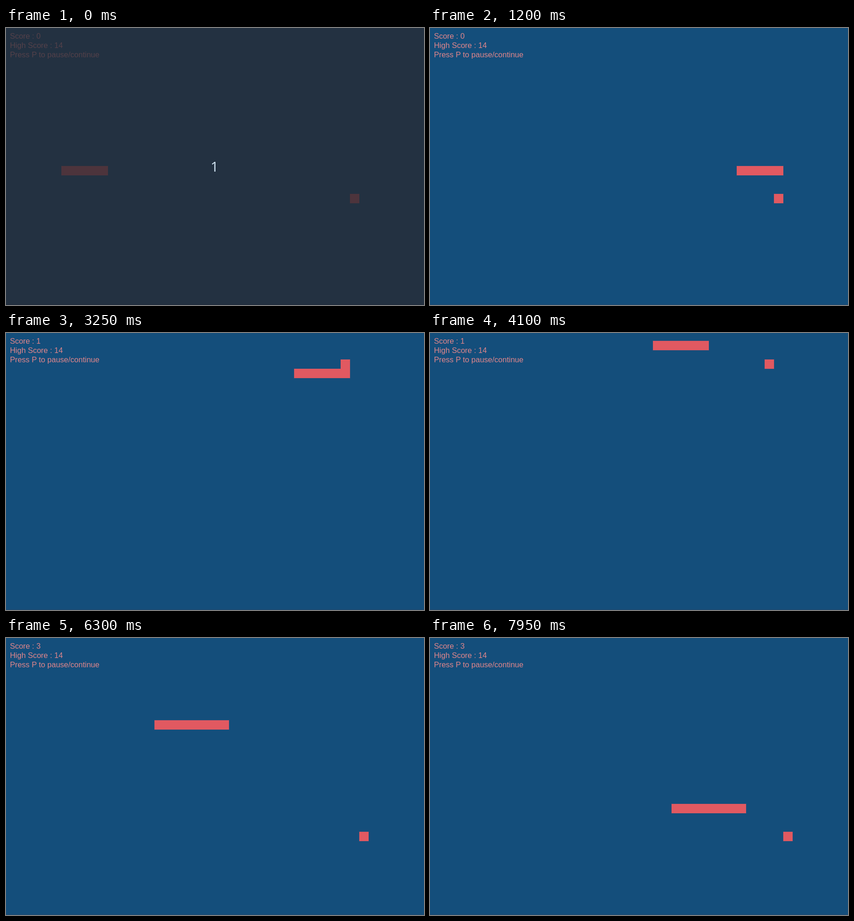
An HTML page that plays this animation: 898 px wide and 596 px high, repeating every 8 s.

```html
<!DOCTYPE html>
<html lang="en">
<head>
<meta charset="utf-8">
<title>Snake</title>
<style>
  html, body { margin: 0; width: 100%; height: 100%; overflow: hidden; }
  svg { display: block; width: 898px; height: 596px;
    --bg: #144e7b; --edge: #1b4b73; --body: #e15961; --ink: #e1868b; }
  svg.wait { --bg: #233141; --edge: #212d3c; --body: #4d343c; --ink: #54414a; }
  .bg { fill: var(--bg); }
  .edge { fill: var(--edge); }
  .body { fill: var(--body); stroke: var(--body); stroke-width: 2; stroke-opacity: .1; }
  .hud { fill: var(--ink); font: 16.5px "Liberation Sans", Arial, sans-serif; }
  .count { fill: #d3e6f5; font: 30px "Open Sans", "Noto Sans", sans-serif; visibility: hidden; }
  .wait .count { visibility: visible; }
</style>
</head>
<body>
<svg id="stage" class="wait" viewBox="0 0 898 596">
  <rect class="bg" width="898" height="596"/>
  <rect class="edge" y="594" width="898" height="2"/>
  <path id="cells" class="body" shape-rendering="crispEdges"/>
  <g class="hud">
    <text id="score" x="8.4" y="23">Score : 0</text>
    <text x="8.4" y="43">High Score : 14</text>
    <text x="8.4" y="63">Press P to pause/continue</text>
  </g>
  <text class="count" x="439.5" y="309">1</text>
</svg>
<script>
const LOOP = 8000, LIGHT_UP = 50, CELL = 20, START_LENGTH = 5;
const SLOT = 50, FIRST_BEAT = 423, BEAT = 62.3;   // ms
const SET_OFF = 305.5, SPEED = 0.0302;            // ms, cells per ms

// The snake's route on the grid: direction and number of cells
const steer = "R32 D3 L18 U7 R18 U7 L19 U3 R19 D2 L33 D6 R32 D12 L12 U3 R11";
const ways = { R: [1, 0], L: [-1, 0], D: [0, 1], U: [0, -1] };
const foods = [[37, 18], [36, 3], [5, 7], [38, 21]];

const route = [[6, 15]];
for (const leg of steer.split(" ")) {
  const [dx, dy] = ways[leg[0]];
  for (let i = 0; i < +leg.slice(1); i++) {
    const [x, y] = route[route.length - 1];
    route.push([x + dx, y + dy]);
  }
}

// The screen is redrawn on a steady beat, held to whole slots
function movesAt(t) {
  const slotEnd = (Math.floor(t / SLOT) + 1) * SLOT;
  const beat = Math.ceil((slotEnd - FIRST_BEAT) / BEAT) - 1;
  if (beat < 0) return 0;
  const drawn = Math.floor((FIRST_BEAT + beat * BEAT) / SLOT) * SLOT;
  return Math.floor((drawn - SET_OFF) * SPEED);
}

const stage = document.getElementById("stage");
const cells = document.getElementById("cells");
const score = document.getElementById("score");
const square = ([x, y]) =>
  `M${x * CELL - 1} ${y * CELL - 3}h${CELL}v${CELL}h-${CELL}z`;

function draw(t) {
  const head = movesAt(t) + START_LENGTH - 1;
  let eaten = 0;
  for (const [x, y] of route.slice(0, head + 1)) {
    const [fx, fy] = foods[eaten];
    if (x === fx && y === fy) eaten++;
  }
  const snake = route.slice(head + 1 - START_LENGTH - eaten, head + 1);
  stage.classList.toggle("wait", t < LIGHT_UP);
  cells.setAttribute("d", [...snake, foods[eaten]].map(square).join(""));
  score.textContent = "Score : " + eaten;
}

const begin = performance.now();
function tick() {
  draw((performance.now() - begin) % LOOP);
  requestAnimationFrame(tick);
}
draw(0);
requestAnimationFrame(tick);
</script>
</body>
</html>
```
